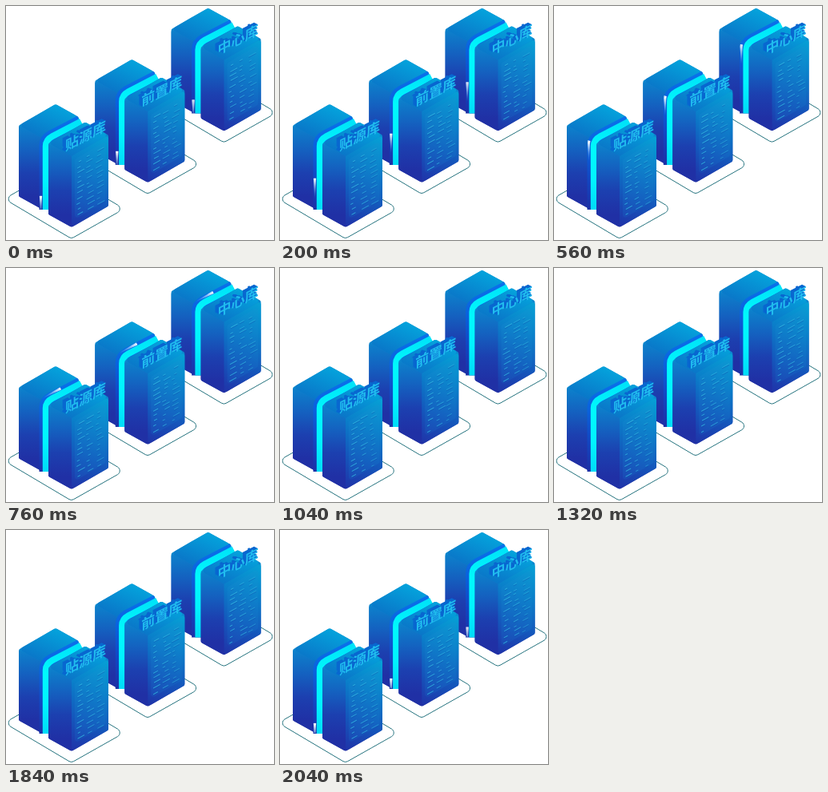
Recreate the animation shown at these times as an HTML page with a canvas. Size 335 px wide and 293 px high, loop 2080 ms.

```html
<!DOCTYPE html>
<html lang="zh">
<head>
<meta charset="utf-8">
<title>数据库</title>
<style>
html, body { margin: 0; width: 100%; height: 100%; overflow: hidden; background: #fff; }
canvas { display: block; width: 335px; height: 293px; }
</style>
</head>
<body>
<canvas id="stage" width="335" height="293"></canvas>
<script>
const ctx = document.getElementById('stage').getContext('2d');
const LOOP = 2080, STEP = 40, TAU = Math.PI * 2;
const FONT = '700 17px "Noto Sans CJK SC", "Noto Sans CJK", "Noto Sans CJK JP", sans-serif';
const names = ['贴源库', '前置库', '中心库'];

// Isometric axes of one cabinet: to the left, to the right, down.
const LEFT = [-29, -16], RIGHT = [46, -26.5], DOWN = [0, 89];
const FRONT = [82, 188], BACK = [45, 165.5];

const add = (...vs) => vs.reduce((a, b) => [a[0] + b[0], a[1] + b[1]]);
const mix = (a, b, k) => a + (b - a) * k;

function rand(n) {
  const v = Math.sin(n * 127.1 + 11.7) * 43758.5453;
  return v - Math.floor(v);
}

function grad(from, to, ...colors) {
  const g = ctx.createLinearGradient(...from, ...to);
  colors.forEach((c, i) => g.addColorStop(i / (colors.length - 1), c));
  return g;
}

// Closed polygon with rounded corners.
function poly(pts, radius) {
  const mid = pts[0].map((v, i) => mix(v, pts[pts.length - 1][i], 0.5));
  ctx.beginPath();
  ctx.moveTo(...mid);
  pts.forEach((p, i) => ctx.arcTo(...p, ...(pts[i + 1] || mid), radius));
  ctx.closePath();
}

function fill(pts, radius, style) {
  poly(pts, radius);
  ctx.fillStyle = style;
  ctx.fill();
}

function base() {
  const near = [81.7, 291.3], left = [-83.9, -49.8], right = [66, -37.3];
  poly([near, add(near, left), add(near, left, right), add(near, right)], 5.5);
  ctx.lineWidth = 1;
  ctx.strokeStyle = '#26747f';
  ctx.stroke();
}

function cabinet(f) {
  const l = add(f, LEFT), r = add(f, RIGHT), top = add(l, RIGHT);
  const [fd, ld, rd] = [f, l, r].map(p => add(p, DOWN));
  fill([top, r, rd, fd, ld, l], 3, grad(l, ld, '#0b88cf', '#1358c0', '#2030a5'));
  fill([top, r, f, l], 3, grad(top, f, '#04a3dc', '#0a76c8'));
  fill([l, f, fd, ld], 2, grad(l, ld, '#0c82cc', '#1462c0', '#1c40b0', '#2030a5'));
  fill([f, r, rd, fd], 2.5, grad(r, fd, '#06a2d6', '#0a80ca', '#1458bc', '#2032a8'));
}

// The bent line up and over the middle slab, starting at column x.
const bend = x => 164 + (x - 43.5) * 0.55;

function ribbon(x, width, style) {
  const y = bend(x);
  ctx.beginPath();
  ctx.moveTo(x, 255);
  ctx.lineTo(x, y + 8);
  ctx.quadraticCurveTo(x, y, x + 8, y - 4.3);
  ctx.lineTo(x + 44, y - 23);
  ctx.lineWidth = width;
  ctx.strokeStyle = style;
  ctx.stroke();
}

function slab() {
  ribbon(48, 13, grad([0, 140], [0, 255], '#0a70ea', '#0a62dc', '#1246c2', '#1c30a6'));
  ribbon(49.8, 8, grad([0, 142], [0, 255], '#00e2f8', '#00fafc', '#00f4ff', '#00dcf8'));
}

function route(s) {
  const x = 43.5, y = bend(x), rise = 255 - y - 8, turn = 14;
  if (s < rise) return [x, 255 - s];
  if (s > rise + turn) {
    const d = s - rise - turn;
    return [x + 8 + d * 0.885, y - 4.3 - d * 0.465];
  }
  const k = (s - rise) / turn, m = 1 - k;
  return [x + 8 * k * k, y + 8 * m * m - 4.3 * k * k];
}

// A tapering glint that climbs the slab, gathers speed and fades at the top.
function light(time) {
  const t = time > LOOP * 0.8 ? time - LOOP : time;
  const head = 16 + 0.1034 * t + 3.5e-5 * t * t, tail = 26;
  const fade = Math.min(1, Math.max(0, (150 - head) / 25));
  for (let i = tail; i >= 0; i--) {
    const s = head - i, k = 1 - i / tail;
    if (s < 0) continue;
    ctx.beginPath();
    ctx.moveTo(...route(s));
    ctx.lineTo(...route(s + 1.2));
    ctx.lineWidth = 0.5 + 2.7 * k;
    ctx.strokeStyle = `rgba(${mix(150, 255, k)},${mix(225, 255, k)},255,${fade * k ** 1.4})`;
    ctx.stroke();
  }
}

function dash(x, y, w, alpha) {
  ctx.fillStyle = `rgba(52,186,226,${alpha})`;
  ctx.fillRect(x, y, w, 1.2);
  ctx.fillStyle = 'rgba(16,70,170,.35)';
  ctx.fillRect(x, y + 1.3, w, 1);
}

// Rows of short readings whose lengths swing at their own pace.
function panel(t, seed) {
  const inset = ([x, y], dx, dy) => [x + dx, y + dy];
  const a = inset(FRONT, 4, 4), b = inset(add(FRONT, RIGHT), -3.5, 7.5);
  fill([a, b, add(b, [0, 75]), add(a, [0, 75])], 3,
    grad(b, add(a, [0, 75]), 'rgba(20,150,208,.35)', 'rgba(24,110,204,.2)'));
  ctx.save();
  ctx.transform(1, -0.55, 0, 1, ...a);
  for (let row = 0; row < 11; row++) {
    for (let col = 0; col < 3; col++) {
      const id = seed * 50 + row * 3 + col;
      const swing = Math.sin((t / LOOP + rand(id)) * TAU);
      const x = 2 + col * 12 + 3 * rand(id + 7);
      const y = 4 + row * 6.5 + 2.5 * rand(id + 13);
      dash(x, y, 6 + 3 * swing, mix(0.75, 0.5, col / 2));
    }
  }
  ctx.restore();
}

function label(name) {
  ctx.save();
  ctx.transform(1, -0.51, 0, 1, 74, 181.8);
  ctx.font = FONT;
  ctx.fillStyle = '#0a68d0';
  for (let d = 4.5; d > 0; d -= 0.5) ctx.fillText(name, -d, -d);
  ctx.fillStyle = '#20bcee';
  ctx.fillText(name, 0, 0);
  ctx.restore();
}

function draw(now) {
  const t = Math.floor((now % LOOP) / STEP) * STEP;
  ctx.fillStyle = '#fff';
  ctx.fillRect(0, 0, 335, 293);
  for (let i = names.length - 1; i >= 0; i--) {
    ctx.save();
    ctx.translate(95.3 * i, -56 * i - 4.2 * i * (i - 1));
    base();
    cabinet(BACK);
    slab();
    light(t);
    cabinet(FRONT);
    panel(t, i + 1);
    label(names[i]);
    ctx.restore();
  }
}

let start;
function tick(now) {
  start ??= now;
  draw(Math.max(0, now - start));
  requestAnimationFrame(tick);
}
draw(0);
requestAnimationFrame(tick);
</script>
</body>
</html>
```
